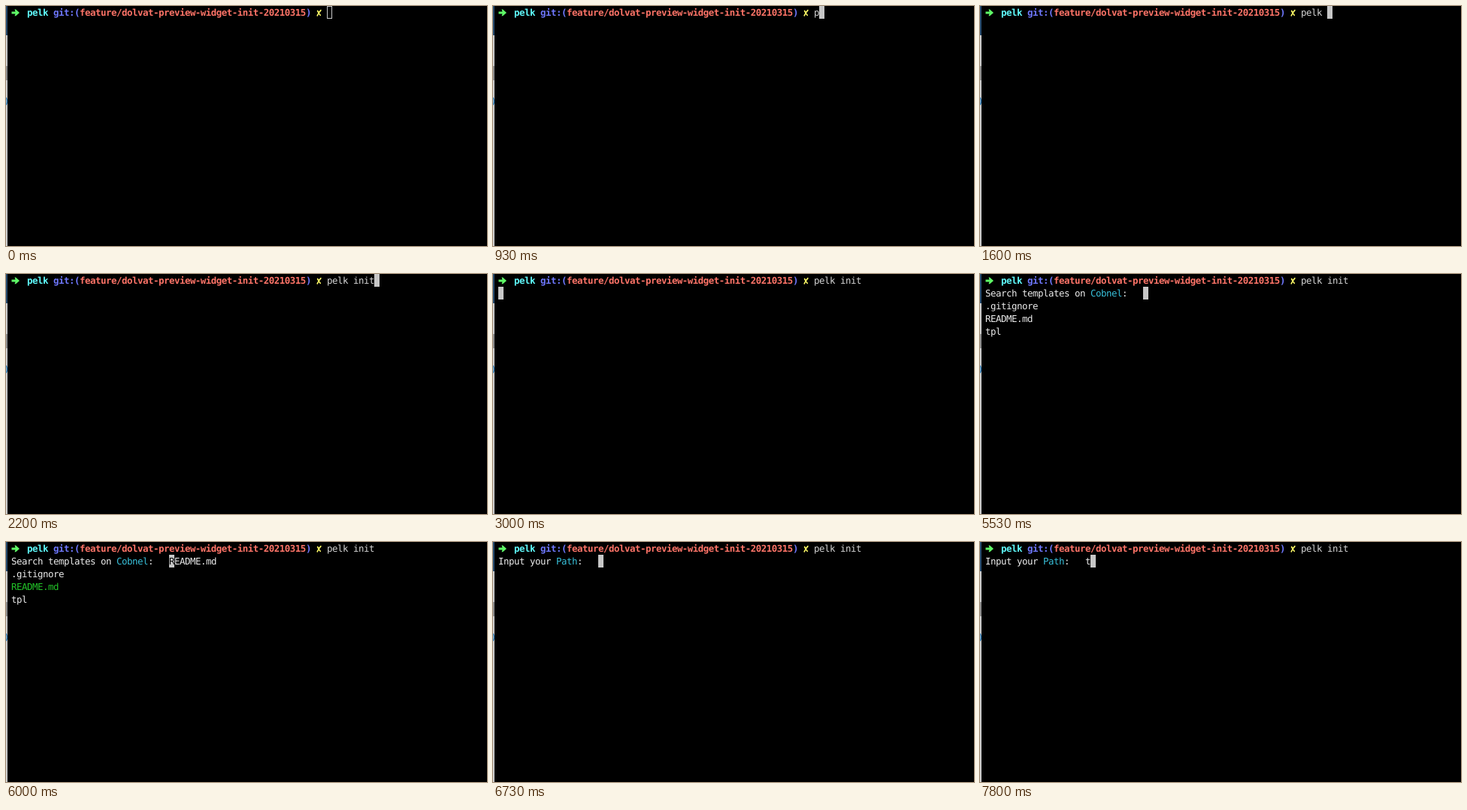
An HTML page that plays this animation: 640x320 px, repeating every 8000 ms.

```html
<!DOCTYPE html>
<html lang="en">
<head>
<meta charset="utf-8">
<title>Terminal session</title>
<style>
  html, body { margin: 0; width: 100%; height: 100%; overflow: hidden; background: #000; }
  svg { display: block; width: 640px; height: 320px; }

  /* tight spacing gives 7px character cells */
  text {
    font: 12.4px "DejaVu Sans Mono", "Liberation Mono", monospace;
    letter-spacing: -.4655px;
    text-rendering: geometricPrecision;
    white-space: pre;
    fill: #ececec;
  }
  .bold text { font-weight: bold; }
  .bold .name { fill: #60fdff; }
  .bold .git { fill: #6f78ff; }
  .bold .branch { fill: #ff7468; }
  .command { fill: #d6d6d6; }
  .accent { fill: #38c0da; }
  .dim { fill: #747474; }
  .on-cursor { fill: #000; }

  .typed, .cursor, .block, .search, .none, .list, .picked, .chosen, .path, .letter {
    animation: 8s step-end infinite;
  }
  .search, .none, .list, .picked, .path, .letter { visibility: hidden; }

  .typed { animation-name: typed; }
  .cursor { animation-name: cursor; }
  .block { fill: #c7c7c7; animation-name: block; }
  .search { animation-name: search; }
  .none { animation-name: none-found; }
  .list { animation-name: list; }
  .picked { animation-name: picked; }
  .chosen { animation-name: chosen; }
  .path { animation-name: path; }
  .letter { animation-name: letter; }

  @keyframes typed {
    0% { transform: translateX(0); }
    10% { transform: translateX(7px); }
    12.5% { transform: translateX(14px); }
    14.375% { transform: translateX(21px); }
    16.25% { transform: translateX(28px); }
    18.125% { transform: translateX(35px); }
    21.25% { transform: translateX(42px); }
    23.75% { transform: translateX(49px); }
    25.625% { transform: translateX(56px); }
    27.5%, 100% { transform: translateX(63px); }
  }
  @keyframes cursor {
    0% { transform: translate(427px, 0); }
    10% { transform: translate(434px, 0); }
    12.5% { transform: translate(441px, 0); }
    14.375% { transform: translate(448px, 0); }
    16.25% { transform: translate(455px, 0); }
    18.125% { transform: translate(462px, 0); }
    21.25% { transform: translate(469px, 0); }
    23.75% { transform: translate(476px, 0); }
    25.625% { transform: translate(483px, 0); }
    27.5% { transform: translate(490px, 0); }
    31.25% { transform: translate(7px, 17px); }
    42.5% { transform: translate(217px, 17px); }
    82.5% { transform: translate(140px, 17px); }
    96.25%, 100% { transform: translate(147px, 17px); }
  }
  @keyframes block {
    0% { fill: #000; }
    5%, 100% { fill: #c7c7c7; }
  }
  @keyframes search {
    0% { visibility: hidden; }
    42.5% { visibility: visible; }
    82.5%, 100% { visibility: hidden; }
  }
  @keyframes none-found {
    0% { visibility: hidden; }
    42.5% { visibility: visible; }
    58.75%, 100% { visibility: hidden; }
  }
  @keyframes list {
    0% { visibility: hidden; }
    58.75% { visibility: visible; }
    82.5%, 100% { visibility: hidden; }
  }
  @keyframes picked {
    0% { visibility: hidden; }
    72.5% { visibility: visible; }
    82.5%, 100% { visibility: hidden; }
  }
  @keyframes chosen {
    0% { fill: #ececec; }
    72.5%, 100% { fill: #22c428; }
  }
  @keyframes path {
    0% { visibility: hidden; }
    82.5%, 100% { visibility: visible; }
  }
  @keyframes letter {
    0% { visibility: hidden; }
    96.25%, 100% { visibility: visible; }
  }
</style>
</head>
<body>
<svg viewBox="0 0 640 320">
  <defs>
    <clipPath id="typing"><rect class="typed" x="364" width="63" height="17"/></clipPath>
  </defs>
  <rect width="640" height="320"/>

  <!-- window behind the left edge -->
  <g>
    <rect width="2" height="39" fill="#24486c"/>
    <rect y="39" width="2" height="281" fill="#c9c9c9"/>
    <rect y="80" width="2" height="19" fill="#8b8b8b"/>
    <path d="M0 122Q3 127 0 132" fill="none" stroke="#2376b5" stroke-width="1.4"/>
  </g>

  <!-- prompt -->
  <g class="bold">
    <path d="M7.5 7.5H12.500L11.500 4.500H13L18 9L13 13.300H11.500L12.500 10.500H7.500Z" fill="#5ff967"/>
    <text class="name" x="28" y="13">pelk</text>
    <text class="git" x="63" y="13">git:(</text>
    <text class="branch" x="98" y="13">feature/dolvat-preview-widget-init-20210315</text>
    <text class="git" x="399" y="13">)</text>
    <path d="M414.200 12.800Q416 8.800 418.900 5.600M414.600 6.400Q416 10 418.200 12.300" fill="none" stroke="#fefb67" stroke-width="1.600" stroke-linecap="round"/>
  </g>
  <g clip-path="url(#typing)"><text class="command" x="427" y="13">pelk init</text></g>

  <g class="cursor">
    <rect width="7" height="17" fill="#c7c7c7"/>
    <rect class="block" x="1" y="1" width="5" height="15"/>
  </g>

  <!-- template search -->
  <g class="search">
    <text x="7" y="30">Search templates on</text>
    <text class="accent" x="147" y="30">Cobnel</text>
    <text x="189" y="30">:</text>
  </g>
  <text class="dim none" x="7" y="47">There is no result.</text>
  <g class="list">
    <text x="7" y="47">.gitignore</text>
    <text class="chosen" x="7" y="64">README.md</text>
    <text x="7" y="81">tpl</text>
  </g>
  <g class="picked">
    <text class="on-cursor" x="217" y="30">R</text>
    <text x="224" y="30">EADME.md</text>
  </g>

  <!-- path question -->
  <g class="path">
    <text x="7" y="30">Input your</text>
    <text class="accent" x="84" y="30">Path</text>
    <text x="112" y="30">:</text>
  </g>
  <text class="letter" x="140" y="30">t</text>
</svg>
</body>
</html>
```
